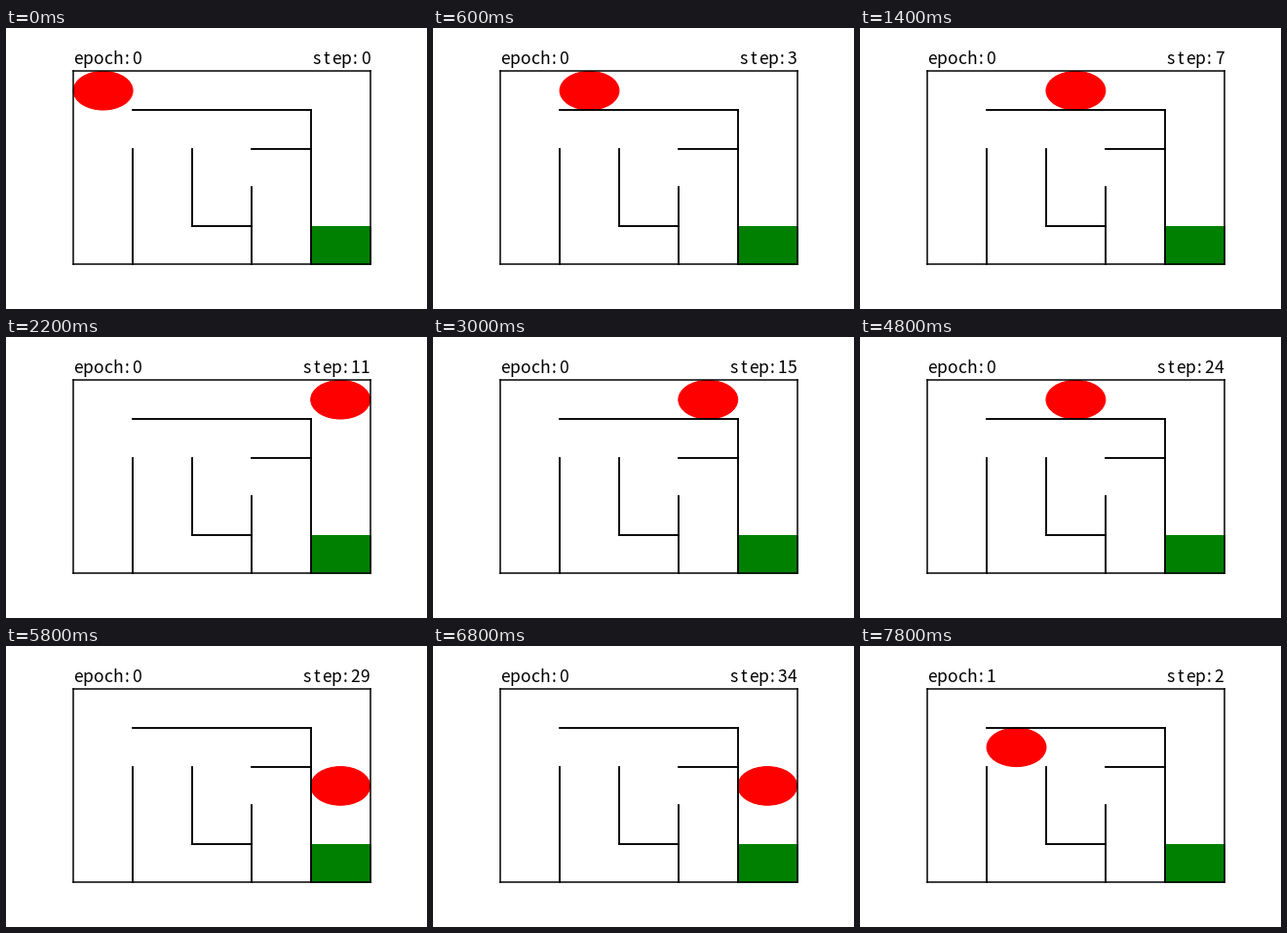
Animation, 432 px wide and 288 px high, one loop 8000 ms. Source, as a matplotlib script:

```python
import matplotlib.pyplot as plt
from matplotlib.animation import FuncAnimation
from matplotlib.patches import Ellipse, Rectangle

W, H, DPI = 432, 288, 72
STEP_MS = 200
X0, Y0 = 69.2, 44.4          # top left corner of the maze
CW, CH = 60.88, 39.6         # cell size
PITCH = 10                   # fixed character advance
BASELINE = 37.3

# One letter per step; "-" is a bump into a wall.
EPOCHS = ["DUR-R---R-R-" "DULL--LL-R-R" "RRDD-U--D-D-", "DR"]
MOVES = {"U": (0, -1), "D": (0, 1), "L": (-1, 0), "R": (1, 0), "-": (0, 0)}

# Inner walls as grid polylines (column, row)
WALLS = [
    [(1, 1), (4, 1)],
    [(4, 1), (4, 5)],
    [(3, 2), (4, 2)],
    [(1, 2), (1, 5)],
    [(2, 2), (2, 4)],
    [(2, 4), (3, 4)],
    [(3, 3), (3, 5)],
]
BORDER = [[(0, 0), (5, 0)], [(5, 0), (5, 5)], [(0, 5), (5, 5)], [(0, 0), (0, 5)]]


def px(col, row):
    return X0 + col * CW, Y0 + row * CH


def walk():
    """List (epoch, step, column, row) for every frame."""
    states = []
    for epoch, moves in enumerate(EPOCHS):
        col = row = 0
        states.append((epoch, 0, col, row))
        for step, move in enumerate(moves, 1):
            dx, dy = MOVES[move]
            col, row = col + dx, row + dy
            states.append((epoch, step, col, row))
    return states


STATES = walk()

fig = plt.figure(figsize=(W / DPI, H / DPI), dpi=DPI, facecolor="white")
ax = fig.add_axes([0, 0, 1, 1])
ax.set_xlim(0, W)
ax.set_ylim(H, 0)
ax.axis("off")


def draw_wall(ends, times=1):
    xs, ys = zip(*(px(c, r) for c, r in ends))
    for _ in range(times):
        ax.plot(xs, ys, color="black", lw=1.5)


def make_slots(left, count):
    """Fixed-pitch character cells starting at x = left."""
    return [
        ax.text(left + (i + 0.5) * PITCH, BASELINE, "", ha="center",
                va="baseline", family="Noto Sans CJK JP", fontsize=17.5)
        for i in range(count)
    ]


def fill_slots(slots, text):
    for slot, char in zip(slots, text):
        slot.set_text(char)


for ends in BORDER:
    draw_wall(ends)
for ends in WALLS:
    draw_wall(ends, 2)      # shared by two cells, so drawn twice

ax.add_patch(Rectangle(px(4, 4), CW, CH, facecolor="green", edgecolor="green", lw=1))
ball = ax.add_patch(Ellipse(px(0.5, 0.5), CW, CH, facecolor="red", edgecolor="red", lw=1))
epoch_slots = make_slots(X0, 7)
step_slots = make_slots(X0 + 5 * CW - 7 * PITCH, 7)


def update(i):
    epoch, step, col, row = STATES[i]
    ball.set_center(px(col + 0.5, row + 0.5))
    fill_slots(epoch_slots, f"epoch:{epoch}")
    fill_slots(step_slots, f"step:{step}".rjust(7))
    return [ball, *epoch_slots, *step_slots]


anim = FuncAnimation(fig, update, frames=len(STATES), interval=STEP_MS,
                     init_func=lambda: update(0), repeat=True, repeat_delay=0)
plt.show()
```
